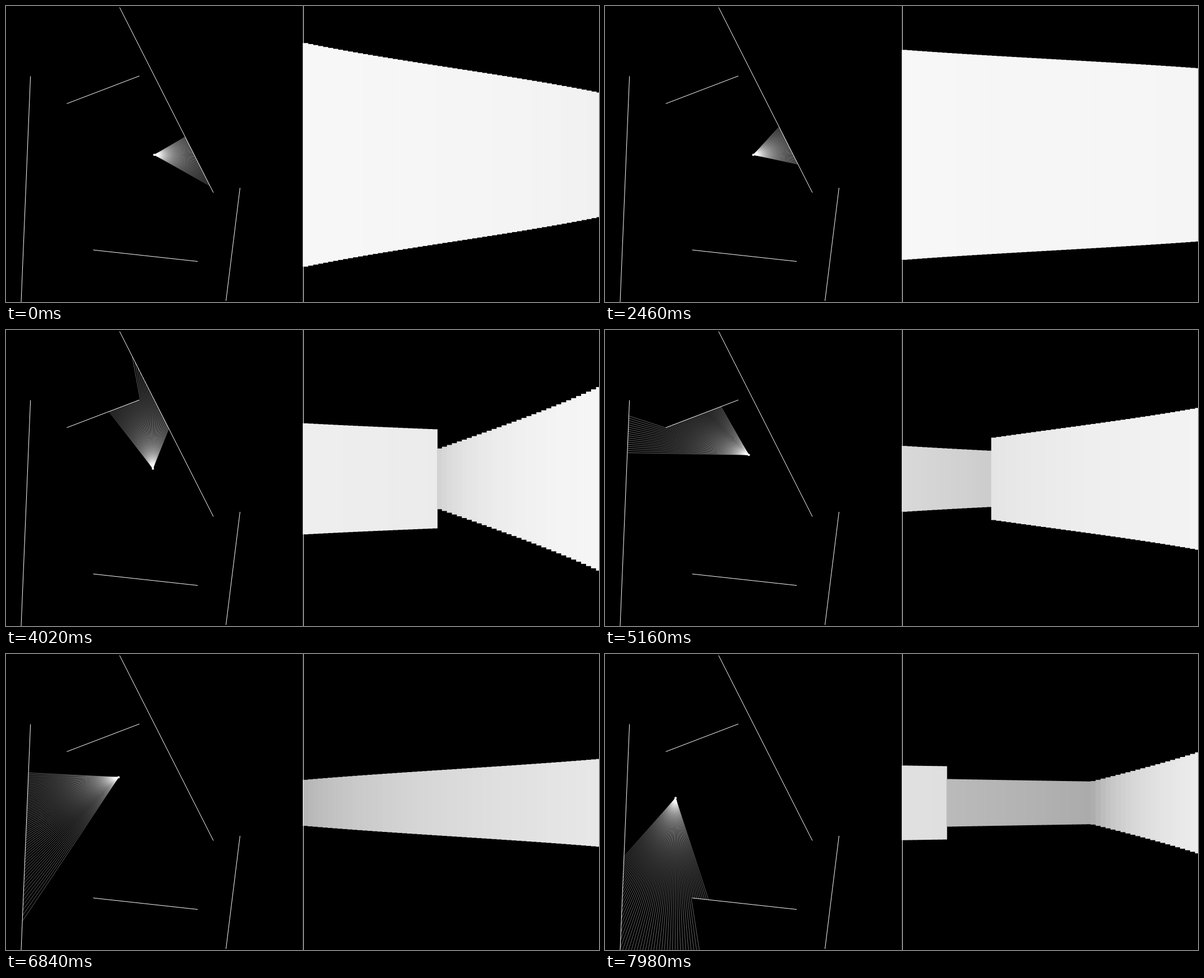
These frames come from a looping animation (1058x529 px, 8 s). An HTML page with a canvas:

```html
<!DOCTYPE html>
<html lang="en">
<head>
<meta charset="utf-8">
<title>Ray casting</title>
<style>
html, body { margin: 0; width: 100%; height: 100%; overflow: hidden; background: #000; }
canvas { display: block; }
</style>
</head>
<body>
<canvas id="stage" width="1058" height="529"></canvas>
<script>
const ctx = document.getElementById('stage').getContext('2d');
const LOOP = 8000, TICK = 60;
const SIZE = 532, SPLIT = 530, RAYS = 60;
const SLICE = SIZE / RAYS, LENS = 22080, RANGE = 515;
const RAD = Math.PI / 180;

const walls = [
  [43.7, 125.5, 26.9, 532],
  [108.5, 174.5, 238, 125],
  [202.7, 2.5, 370, 333.5],
  [417.5, 325, 392.5, 527],
  [155.5, 436, 342, 456.5]
];
const borders = [
  [-2, 0, SPLIT, 0],
  [SPLIT, 0, SPLIT, SIZE],
  [SPLIT, SIZE, -2, SIZE],
  [-2, SIZE, -2, 0]
];
const solids = walls.concat(borders);

const rep = (n, v) => Array(n).fill(v);

// Key presses: start time, then the amount per tick (turns in 0.1 rad, walks in px)
const moves = [
  ['turn', 2460, [3, 3, 3, 1]],
  ['turn', 2820, [2, 2, 2, 0, 1]],
  ['walk', 3840, rep(9, 4.62)],
  ['turn', 4440, [2, 3, 3, 1]],
  ['walk', 5160, [3, ...rep(5, 6.5)]],
  ['turn', 5640, [3, 3, 3, 1]],
  ['walk', 6300, rep(3, 4)],
  ['walk', 6660, [...rep(4, 4.75), ...rep(15, 5.573)]],
  ['turn', 7860, [3, 3, 3]]
];

function pose(time) {
  const p = { x: 264.5, y: 266, heading: 0 };
  for (const [kind, start, amounts] of moves) {
    const ticks = Math.floor((time - start) / TICK + 1.001);
    if (ticks <= 0) break;
    const sum = amounts.slice(0, ticks).reduce((a, b) => a + b, 0);
    if (kind === 'turn') {
      p.heading -= sum * 0.1;
    } else {
      p.x += sum * Math.cos(p.heading);
      p.y += sum * Math.sin(p.heading);
    }
  }
  return p;
}

function cast(p, angle) {
  const dx = Math.cos(angle), dy = Math.sin(angle);
  let best = Infinity;
  for (const [x1, y1, x2, y2] of solids) {
    const wx = x2 - x1, wy = y2 - y1;
    const den = dx * wy - dy * wx;
    if (!den) continue;
    const px = x1 - p.x, py = y1 - p.y;
    const dist = (px * wy - py * wx) / den;
    const along = (px * dy - py * dx) / den;
    if (dist > 0 && along >= 0 && along <= 1 && dist < best) best = dist;
  }
  return best;
}

function line(x1, y1, x2, y2) {
  ctx.beginPath();
  ctx.moveTo(x1, y1);
  ctx.lineTo(x2, y2);
  ctx.stroke();
}

function draw(time) {
  const p = pose(time);
  const depths = [];

  ctx.fillStyle = '#000';
  ctx.fillRect(0, 0, 1058, 529);
  ctx.lineWidth = 1;
  ctx.strokeStyle = '#fff';
  for (const w of walls) line(...w);

  ctx.strokeStyle = 'rgba(255,255,255,0.392)';
  for (let i = 0; i < RAYS; i++) {
    const offset = (i - RAYS / 2) * RAD;
    const angle = p.heading + offset;
    const dist = cast(p, angle);
    line(p.x, p.y, p.x + dist * Math.cos(angle), p.y + dist * Math.sin(angle));
    depths.push(dist * Math.cos(offset));
  }

  ctx.fillStyle = '#fff';
  ctx.beginPath();
  ctx.arc(p.x, p.y, 2, 0, 7);
  ctx.fill();

  depths.forEach((d, i) => {
    const h = LENS / d;
    const tone = Math.round(250 * (1 - (d / RANGE) ** 2));
    ctx.fillStyle = `rgb(${tone},${tone},${tone})`;
    ctx.fillRect(SPLIT + i * SLICE - 0.5, (SIZE - h) / 2, SLICE + 1, h);
  });

  ctx.fillStyle = '#fff';
  ctx.fillRect(SPLIT, 0, 1, 529);
}

const begin = performance.now();
function loop(now) {
  draw(Math.max(0, now - begin) % LOOP);
  requestAnimationFrame(loop);
}
draw(0);
requestAnimationFrame(loop);
</script>
</body>
</html>
```
